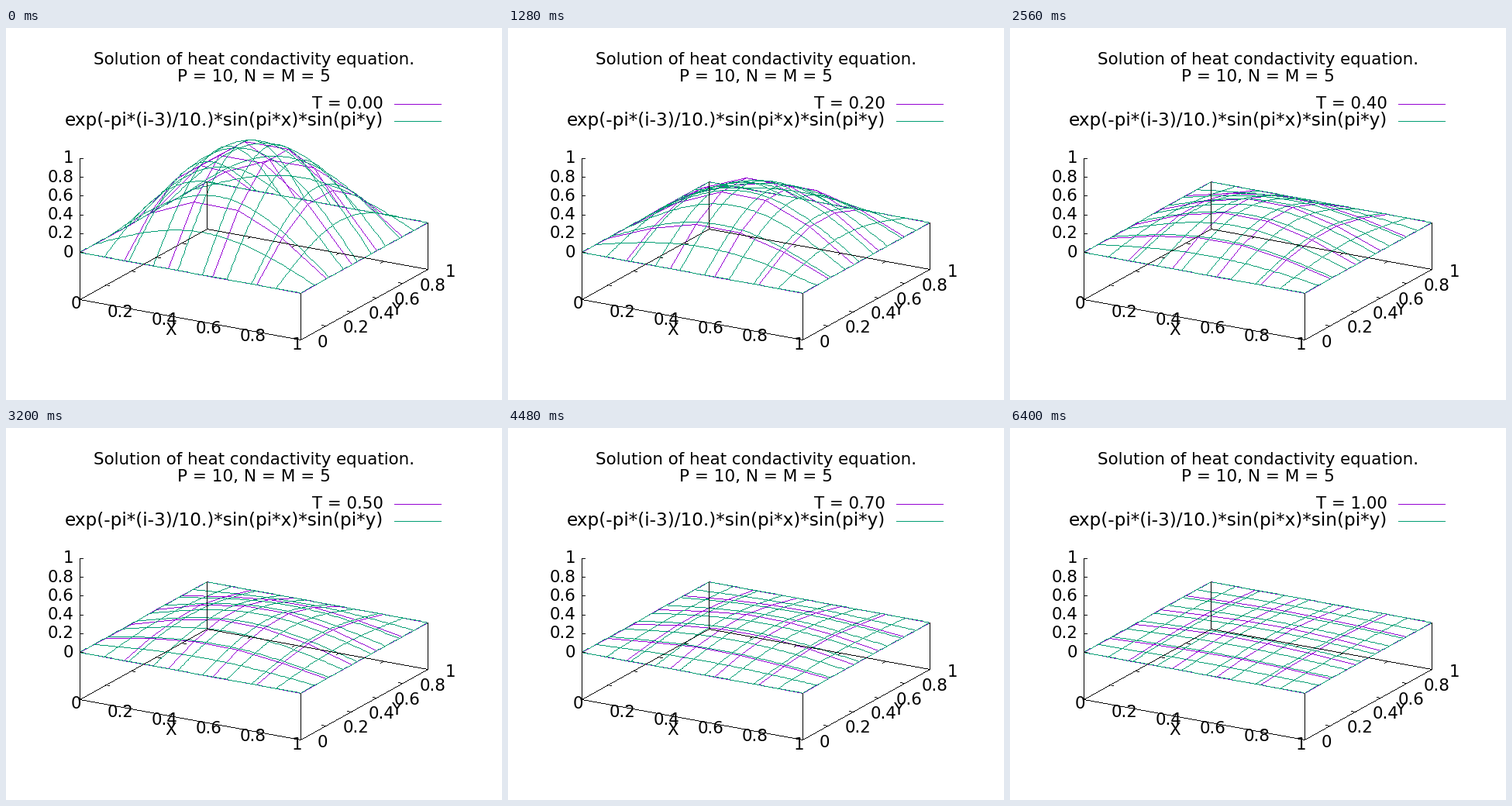
Recreate the animation shown at these times as a matplotlib script. Size 640 px wide and 480 px high, loop 7040 ms.

```python
import numpy as np
import matplotlib.pyplot as plt
from matplotlib.animation import FuncAnimation

W, H = 640, 480
STEPS, INTERVAL = 11, 640
PURPLE, GREEN, BLACK = "#9400d3", "#009e73", "#000000"
SIZE = 19.2

# Box seen at 60 degrees tilt and 30 degrees turn, y pointing down
SX, SY = 329, 210
COS, SIN = np.cos(np.pi / 6), 0.5
XV = np.array([SX * COS, SY * SIN * SIN])
YV = np.array([SX * SIN, -SY * COS * SIN])
ZV = np.array([0, -SY * COS / 1.5])
FLOOR = -0.5
ORIGIN = np.array([320, 239]) - XV / 2 - YV / 2 - ZV * (1 + FLOOR) / 2

# Decay of the split implicit scheme over one time step
CELL, DT = 0.2, 0.1
RATE = DT / (2 * np.pi) * (2 / CELL * np.sin(np.pi * CELL / 2)) ** 2
STEP_DECAY = (1 + RATE) ** -2


def project(x, y, z):
    x, y, z = np.broadcast_arrays(x, y, z)
    return ORIGIN + x[..., None] * XV + y[..., None] * YV + z[..., None] * ZV


def segment(a, b):
    """Bresenham pixels from a to b, always walked in rising direction."""
    d = np.abs(b - a)
    major = int(d[1] > d[0])
    if a[major] > b[major]:
        a, b = b, a
    n = int(max(d[major], 1))
    k = np.arange(n + 1)[:, None]
    return a + np.sign(b - a) * np.floor(k * d / n + 0.5)


def trace(points):
    """Pixels of a polyline whose corners sit on whole pixels."""
    p = np.asarray(points, float)
    p = np.column_stack([np.floor(p[:, 0]), np.ceil(p[:, 1])])
    return np.concatenate([segment(a, b) for a, b in zip(p, p[1:])])


def mesh(amp, lines, samples):
    """Pixels of the isolines of amp*sin(pi x)*sin(pi y) in both directions."""
    s = np.linspace(0, 1, samples)
    parts = []
    for c in np.linspace(0, 1, lines):
        z = amp * np.sin(np.pi * c) * np.sin(np.pi * s)
        parts += [trace(project(s, c, z)), trace(project(c, s, z))]
    return np.concatenate(parts)


fig = plt.figure(figsize=(8, 6), dpi=80, facecolor="white")
ax = fig.add_axes([0, 0, 1, 1])
ax.set(xlim=(0, W), ylim=(H, 0))
ax.axis("off")


def pixels(color, zorder):
    return ax.plot([], [], ",", color=color, zorder=zorder, antialiased=False)[0]


def show(line, p):
    line.set_data(p[:, 0] + 0.25, p[:, 1] + 0.75)


def label(x, y, s, ha="center", size=SIZE):
    return ax.text(x, y, s, ha=ha, va="baseline", fontsize=size,
                   family="DejaVu Sans", color=BLACK, zorder=5)


def frame_lines():
    def at(x, y, z=FLOOR):
        return project(x, y, z)

    segs = [[at(0, 0), at(1, 0), at(1, 1), at(0, 1), at(0, 0)],
            [at(0, 0), at(0, 0, 1)]]
    segs += [[at(x, y), at(x, y, 0)] for x, y in ((1, 0), (0, 1), (1, 1))]
    for v in np.linspace(0, 1, 6):
        z = at(0, 0, v)
        segs.append([z, z + [4, 0]])
        if 0 < v < 1:
            for side, d in ((0, 1), (1, -1)):
                x, y = at(v, side), at(side, v)
                segs += [[x, x + d * 0.025 * YV], [y, y + d * 0.018 * XV]]
    return np.concatenate([trace(s) for s in segs])


numeric = pixels(PURPLE, 1)
exact = pixels(GREEN, 2)
show(pixels(BLACK, 3), frame_lines())

# Titles and key
label(319.8, 47, "Solution of heat condactivity equation.")
label(320, 69, "P = 10, N = M = 5", size=19.5)
clock = label(486.5, 104, "", "right")
label(487, 126, "exp(-pi*(i-3)/10.)*sin(pi*x)*sin(pi*y)", "right", 20.85)
for y, color in ((98, PURPLE), (120, GREEN)):
    show(pixels(color, 2), trace([[501, y], [561, y]]))

# Axis labels
for v in np.linspace(0, 1, 6):
    s = f"{v:.1g}"
    x, y = project(v, 0, FLOOR)
    label(x - 4.8, y + 13, s)
    x, y = project(1, v, FLOOR)
    label(x + 21.5, y + 10, s, "left")
    x, y = project(0, 0, v)
    label(87.5, y + 7, s, "right")
label(212.5, 395.5, "X")
label(504, 369.5, "Y")


def update(k):
    show(numeric, mesh(STEP_DECAY ** k, 6, 6))
    show(exact, mesh(np.exp(-np.pi * k / 10), 10, 100))
    clock.set_text(f"T = {k / 10:.2f}")
    return numeric, exact, clock


anim = FuncAnimation(fig, update, frames=STEPS, interval=INTERVAL,
                     repeat=True, repeat_delay=0, blit=False)
plt.show()
```
